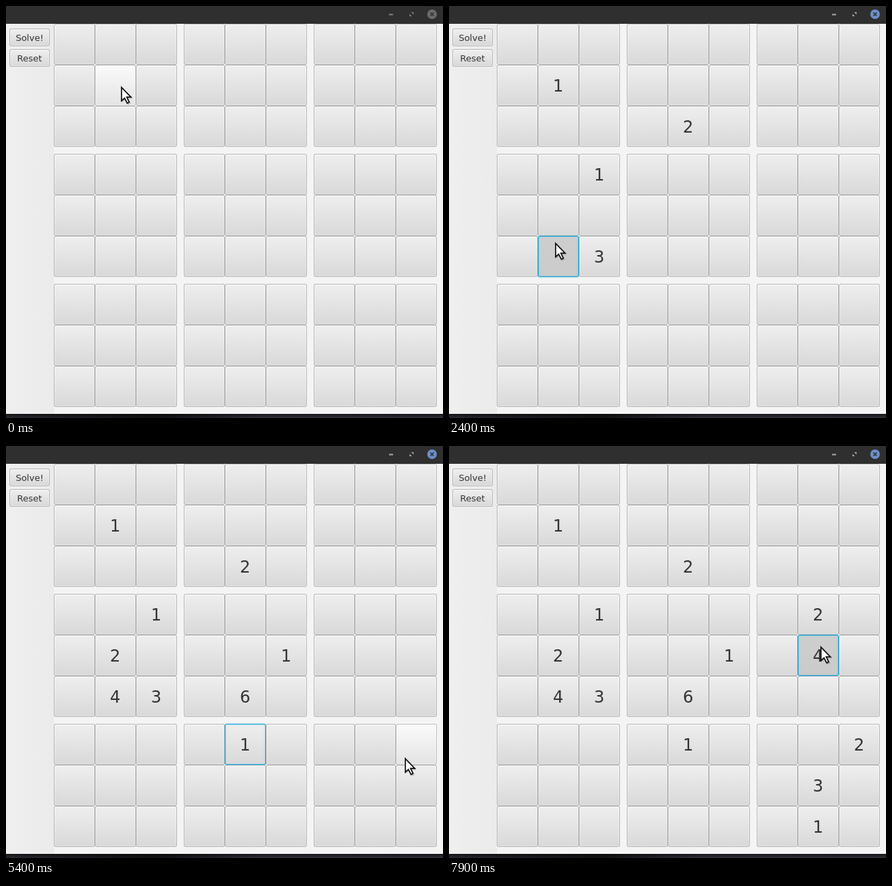
These frames come from a looping animation (639x602 px, 8000 ms). An HTML page:

```html
<!DOCTYPE html>
<html lang="en">
<head>
<meta charset="utf-8">
<title>Number grid</title>
<style>
  html, body { margin: 0; width: 100%; height: 100%; overflow: hidden; }
  body { background: #f4f4f4; font-family: "DejaVu Sans", sans-serif; cursor: default; }
  #stage { position: absolute; left: 0; top: 0; width: 639px; height: 602px; overflow: hidden; background: #f4f4f4; }
  #stage > * { position: absolute; box-sizing: border-box; }
  #title { left: 0; top: 0; width: 639px; height: 26px; background: #2f2f2f; }
  #side { left: 0; top: 26px; width: 70px; height: 570px; background: linear-gradient(to right, #efefef, #ebebeb); }
  #edge {
    left: 0; top: 596px; width: 639px; height: 6px;
    background:
      linear-gradient(#0009, #0000),
      linear-gradient(to right, #2c2c34, #121216 34%, #33343d 58%, #30313a);
  }
  .btn {
    --rim: #b5b5b5; --hi: #fcfcfc; --lo: #e3e3e3; --top: #eeeeee; --end: #d9d9d9;
    border: 1px solid transparent; padding: 1px; border-radius: 3px; text-align: center; color: #333;
    background:
      linear-gradient(var(--top), var(--end)) content-box,
      linear-gradient(var(--hi), var(--lo)) padding-box,
      linear-gradient(var(--rim), var(--rim)) border-box;
    box-shadow: 0 1px #fffa;
  }
  .btn span { position: relative; left: -.4px; top: 1px; }
  .tool { left: 5px; width: 59px; height: 26px; font-size: 13px; line-height: 22px; }
  .tool span { left: 0; top: .5px; }
  .cell { width: 60px; height: 60px; font-size: 24px; line-height: 56px; }
  .hover { --rim: #bebebe; --hi: #fff; --lo: #f0f0f0; --top: #fafafa; --end: #e4e4e4; }
  .down { --hi: #dcdcdc; --lo: #d0d0d0; --top: #cecece; --end: #cbcbcb; }
  .focus { --rim: #039ed3; box-shadow: 0 0 0 1.4px #039ed322, inset 0 0 0 1.6px #039ed322; }
  #close { fill: #6b6b6b; }
  .active #close { fill: #6c8fcb; }
  #marks { stroke: #808080; fill: #808080; }
  .active #marks { stroke: #a8a8a8; fill: #a8a8a8; }
  #pointer { left: -1px; top: -1px; overflow: visible; }
</style>
</head>
<body>
<div id="stage">
  <div id="side"></div>
  <svg id="title" width="639" height="26">
    <g id="marks">
      <path d="M560 12.5h6" stroke-width="2"/>
      <path d="M592.5 9h3.5v3.5zM590 11.5v3.5h3.5z" stroke="none"/>
    </g>
    <circle id="close" cx="623" cy="12" r="7"/>
    <path d="M620.5 9.5l5 5m0 -5l-5 5" stroke="#2f2f2f" stroke-width="1.5"/>
  </svg>
  <div class="btn tool" style="top:33px"><span>Solve!</span></div>
  <div class="btn tool" style="top:63px"><span>Reset</span></div>
  <div id="edge"></div>
  <svg id="pointer" width="20" height="30">
    <path d="M1.5 3v21l5 -4l4 7.500l4 -2l-4 -7h7z" fill="#000" opacity=".18"/>
    <path d="M.9 1.800V21.500L5.400 17.500L9.300 25L12.200 23.500L8.600 16.200H14.800Z" fill="#fff" stroke="#111" stroke-width="1.7"/>
  </svg>
</div>
<script>
const LOOP = 8000, STEP = 100;
const TRAVEL = 2 * STEP, REST = 2 * STEP;   // time to reach a cell, then to hover before pressing
const stage = document.getElementById('stage');
const pointer = document.getElementById('pointer');

// A stop of the pointer: it rests at x, y, then clicks until the cell shows the digit.
const visit = (x, y, press, digit, end = press + digit * STEP) => ({ x, y, press, digit, end });

const visits = [
  visit(169, 118, 200, 1),
  visit(344, 168, 800, 2),
  visit(227, 226, 1300, 1),
  visit(210, 352, 1900, 3),
  visit(156, 346, 2400, 4, 3200),
  visit(156, 322, 3300, 2),
  visit(416, 300, 3900, 1),
  visit(365, 351, 4300, 6, 4600),
  visit(349, 426, 5000, 1, 5300),
  visit(584, 456, 5600, 2),
  visit(538, 545, 6000, 1, 6200),
  visit(523, 467, 6300, 3),
  visit(538, 313, 7000, 0),
  visit(540, 250, 7200, 2),
  visit(544, 293, 7500, 4, 7800),
  visit(544, 293, 7900, 5)
];

const offset = i => i * 60 + Math.floor(i / 3) * 10;

const cells = Array.from({ length: 81 }, (_, i) => {
  const x = 70 + offset(i % 9), y = 26 + offset(Math.floor(i / 9));
  const el = document.createElement('div');
  const label = el.appendChild(document.createElement('span'));
  el.style.left = x + 'px';
  el.style.top = y + 'px';
  stage.insertBefore(el, pointer);
  return { el, label, x, y };
});

const cellAt = ({ x, y }) =>
  cells.findIndex(c => x >= c.x && x < c.x + 60 && y >= c.y && y < c.y + 60);

visits.forEach((v, i) => {
  const free = i ? visits[i - 1].end : 0;
  v.cell = cellAt(v);
  v.arrive = Math.max(free, v.press - REST);
  v.leave = Math.max(free, v.arrive - TRAVEL);
});

const easeOut = p => 1 - (1 - p) ** 3;

function pointerAt(t) {
  const i = visits.findLastIndex(v => v.leave <= t);
  const to = visits[i], from = visits[i - 1] || to;
  const span = to.arrive - to.leave;
  const p = span ? easeOut(Math.min(1, (t - to.leave) / span)) : 1;
  return {
    x: Math.round(from.x + (to.x - from.x) * p),
    y: Math.round(from.y + (to.y - from.y) * p)
  };
}

function stateAt(t) {
  const digits = {};
  let focus = -1, down = false;
  for (const v of visits) {
    if (!v.digit || v.press > t) continue;
    const left = Math.max(0, Math.ceil((v.end - t) / STEP));
    const shown = t > v.press ? Math.max(0, v.digit - left) : 0;
    focus = v.cell;
    down = shown === 0;
    if (shown) digits[v.cell] = shown;
  }
  return { digits, focus, down };
}

function draw(t) {
  const { digits, focus, down } = stateAt(t);
  const tip = pointerAt(t);
  const hover = cellAt(tip);
  pointer.style.transform = `translate(${tip.x}px, ${tip.y}px)`;
  stage.classList.toggle('active', t >= visits[0].press);
  cells.forEach(({ el, label }, i) => {
    const names = ['btn', 'cell'];
    if (i === focus) names.push('focus');
    if (i === focus && down) names.push('down');
    else if (i === hover) names.push('hover');
    el.className = names.join(' ');
    const text = String(digits[i] || '');
    if (label.textContent !== text) label.textContent = text;
  });
}

const start = performance.now();
function tick() {
  const t = (performance.now() - start) % LOOP;
  draw(Math.floor(t / STEP) * STEP);
  requestAnimationFrame(tick);
}
tick();
</script>
</body>
</html>
```
